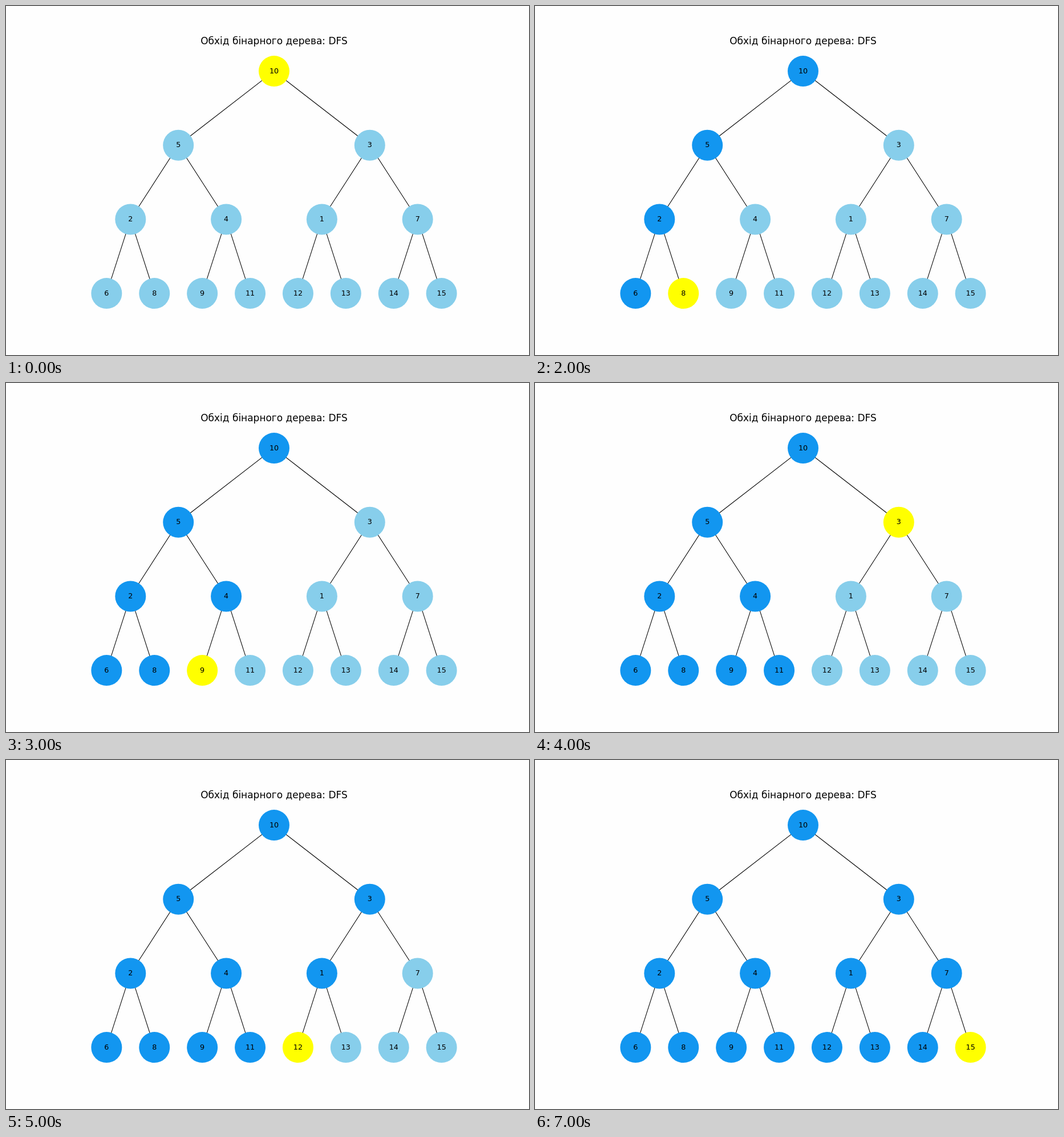
Animation of 917 by 611 pixels, one loop 7500 ms. Source, as an HTML page:

```html
<!DOCTYPE html>
<html lang="uk">
<head>
<meta charset="utf-8">
<style>
html, body { margin: 0; width: 100%; height: 100%; overflow: hidden; background: #fefefe; }
svg { display: block; width: 917px; height: 611px; }
text { font: 12.73px "DejaVu Sans", sans-serif; text-anchor: middle; }
text.title { font-size: 16.98px; }
line { stroke: #000; stroke-width: 1.06; }
</style>
</head>
<body>
<svg viewBox="0 0 917 611">
  <text class="title" x="470" y="67">Обхід бінарного дерева: DFS</text>
</svg>
<script>
const STEP = 500;
const WAITING = '#87ceeb', ACTIVE = '#ffff00', VISITED = '#1296f0';
// Level order: the children of i are 2i + 1 and 2i + 2
const values = [10, 5, 3, 2, 4, 1, 7, 6, 8, 9, 11, 12, 13, 14, 15];
const svg = document.querySelector('svg');

function add(tag, attrs, text = '') {
  const el = document.createElementNS('http://www.w3.org/2000/svg', tag);
  for (const key in attrs) el.setAttribute(key, attrs[key]);
  el.textContent = text;
  return svg.appendChild(el);
}

function place(i) {
  const level = Math.floor(Math.log2(i + 1));
  const count = 2 ** level;
  return {
    x: 470 + 671.2 * ((i + 1 - count + 0.5) / count - 0.5),
    y: 114.1 + 129.67 * level
  };
}

function preorder(i) {
  return i < values.length ? [i, ...preorder(2 * i + 1), ...preorder(2 * i + 2)] : [];
}

const nodes = values.map((_, i) => place(i));
nodes.slice(1).forEach((node, i) => {
  const parent = nodes[i >> 1];
  add('line', { x1: parent.x, y1: parent.y, x2: node.x, y2: node.y });
});
const circles = nodes.map(({ x, y }) => add('circle', { cx: x, cy: y, r: 27 }));
nodes.forEach(({ x, y }, i) => add('text', { x, y: y + 3.7 }, values[i]));

const order = preorder(0);

function draw() {
  const current = Math.floor(performance.now() / STEP) % order.length;
  order.forEach((node, k) => {
    const color = k < current ? VISITED : k > current ? WAITING : ACTIVE;
    circles[node].setAttribute('fill', color);
  });
  requestAnimationFrame(draw);
}
draw();
</script>
</body>
</html>
```
